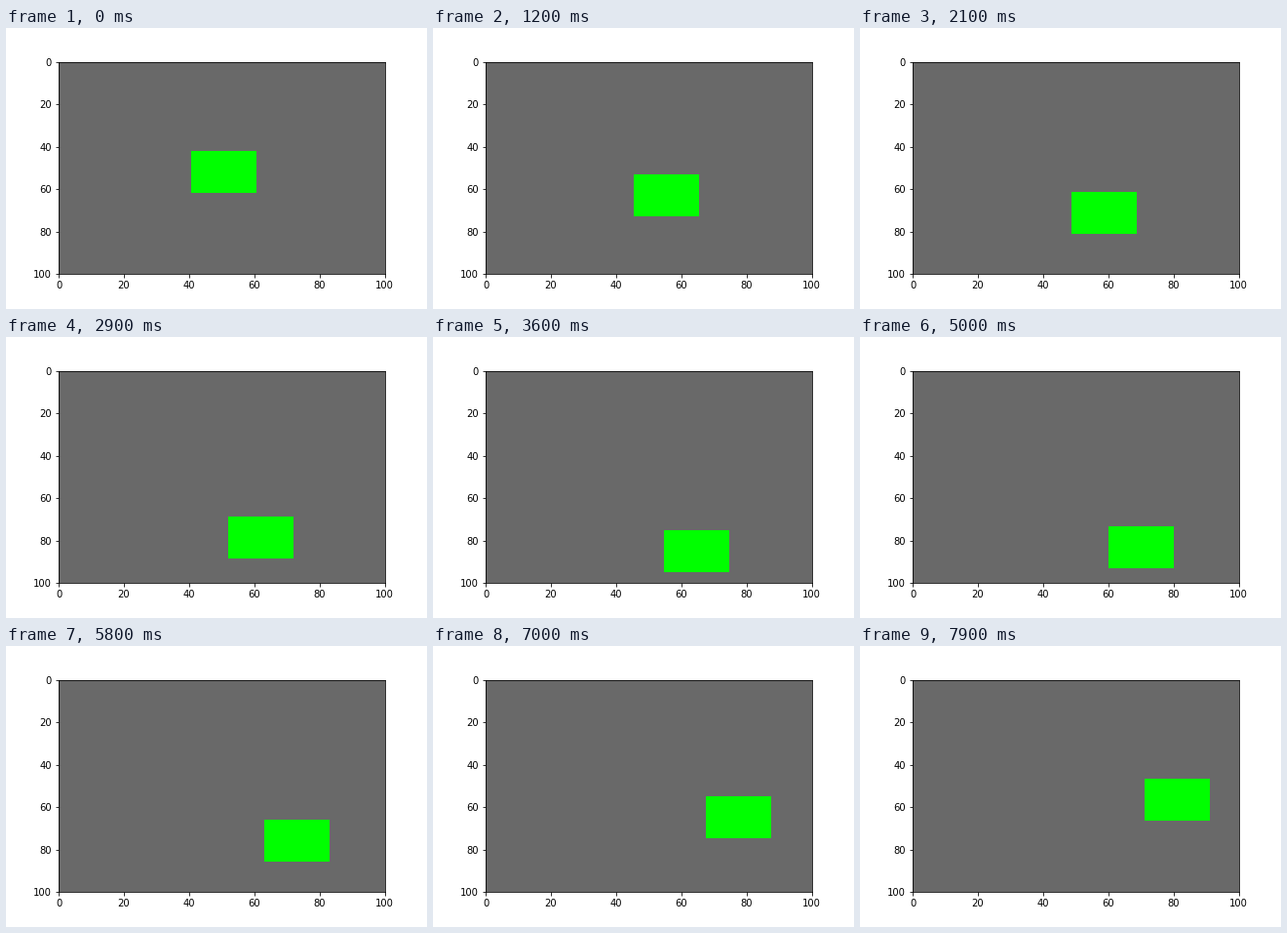
Write a matplotlib script that moves like this. It is 432 px wide and 288 px high and loops after 8000 ms.

```python
import numpy as np
import matplotlib.pyplot as plt
from matplotlib.animation import FuncAnimation
from matplotlib.patches import Rectangle

FRAMES, INTERVAL = 80, 100
START, SIZE, LIMIT = 40, 20, 100
ANGLE = 3 * np.pi / 8
VX, VY = np.cos(ANGLE), np.sin(ANGLE)
# First step at which the box has passed the lower wall
BOUNCE = int(np.ceil((LIMIT - SIZE - START) / VY))

plt.rcParams["font.family"] = "DejaVu Sans"
plt.rcParams["font.size"] = 10

fig = plt.figure(figsize=(6, 4), dpi=72, facecolor="white")
ax = fig.add_axes([0.125, 0.125, 0.775, 0.755], facecolor="dimgray")
ax.set_xlim(0, LIMIT)
ax.set_ylim(LIMIT, 0)
ax.set_xticks(range(0, LIMIT + 1, 20))
ax.set_yticks(range(0, LIMIT + 1, 20))

box = ax.add_patch(Rectangle((START, START), SIZE, SIZE, fc="lime", ec="none", lw=0))


def update(i):
    step = i + 2
    x = START + VX * step
    y = START + VY * (BOUNCE - abs(step - BOUNCE))
    box.set_xy((x, y))
    return (box,)


anim = FuncAnimation(fig, update, frames=FRAMES, interval=INTERVAL,
                     repeat=True, repeat_delay=0)
plt.show()
```
